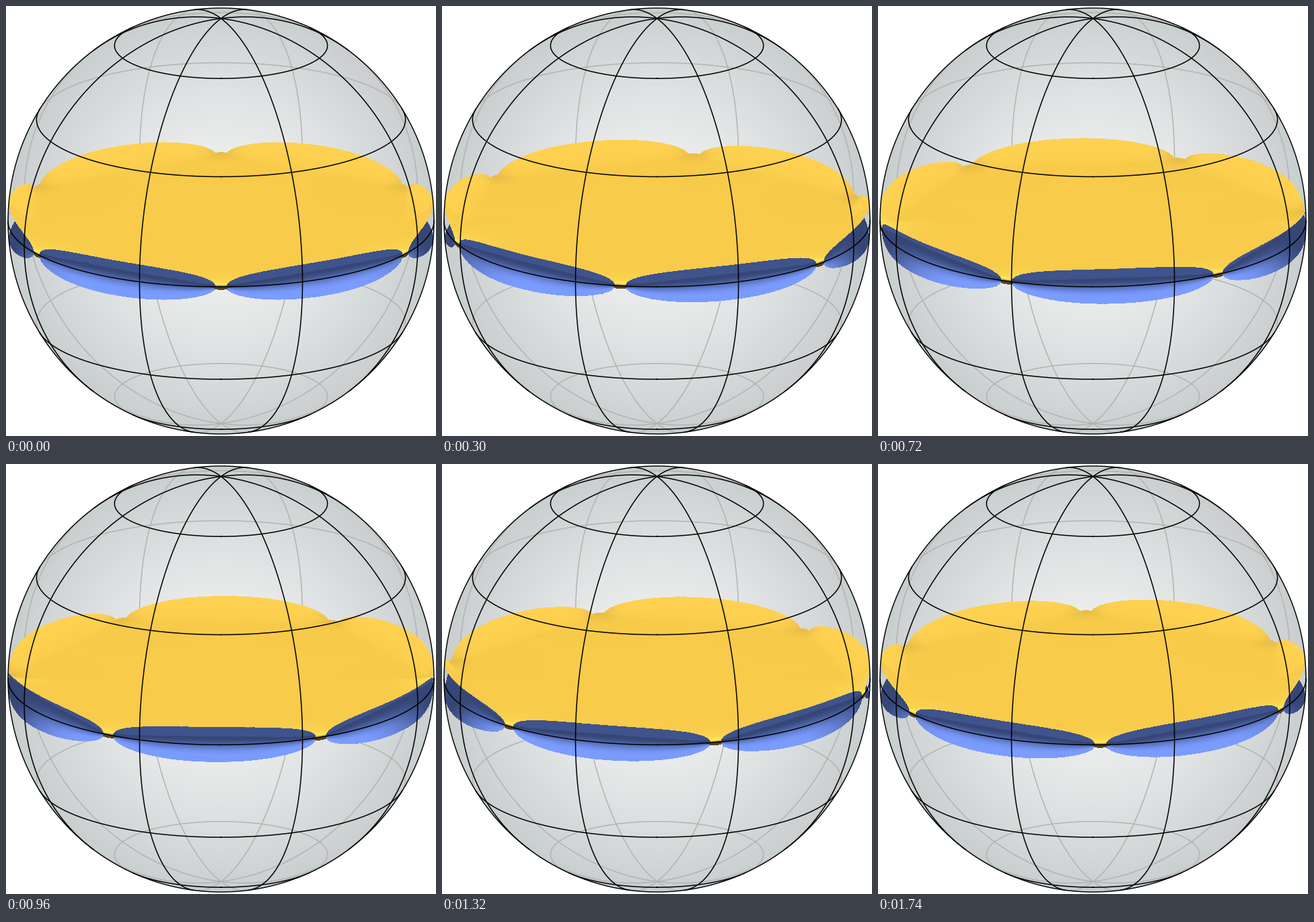
Write a matplotlib script that moves like this. It is 636 by 636 pixels and loops after 1800 ms.

```python
import numpy as np
import matplotlib.pyplot as plt
from matplotlib.animation import FuncAnimation

SIZE, CENTER, R = 636, 317.5, 315
FRAMES, INTERVAL = 30, 60
TILT = np.radians(18)
SE, CE = np.sin(TILT), np.cos(TILT)
APOTHEM = np.cos(np.pi / 6)
TOP, BOTTOM = 184, 452          # rows that the plate can reach
ZMAX = 0.1
STEPS = 30
NECK = 0.015

YELLOW = np.array([248, 203, 75])
YELLOW_LIT = np.array([255, 210, 82])
GLOW = np.array([255, 230, 90])
SHADE = np.array([222, 181, 66])
WALL = np.array([84, 68, 30])
UNDER = np.array([112, 90, 36])
CEILING = np.array([63, 83, 140])
FLOOR_IN = np.array([54, 70, 118])
FLOOR_OUT = np.array([122, 156, 255])


def mix(a, b, t):
    return a + (b - a) * np.asarray(t)[..., None]


def smoothstep(lo, hi, v):
    t = np.clip((v - lo) / (hi - lo), 0, 1)
    return t * t * (3 - 2 * t)


def sector_angle(x, f):
    """Angle from the middle of the nearest hexagon edge."""
    return np.mod(np.arctan2(x, f), np.pi / 3) - np.pi / 6


def rim_latitude(psi):
    u = np.clip(np.abs(psi) / np.radians(28.5), 0, 1)
    return np.radians(4.95) * (1 - u ** 2.2) ** (1 / 2.2)


def profile(x, f):
    """Half thickness, flare fraction and distance to the nearest vertex."""
    psi = sector_angle(x, f)
    r = np.hypot(x, f)
    a = r * np.cos(psi)
    lat = rim_latitude(psi)
    span = np.maximum(np.cos(lat) * np.cos(psi) - APOTHEM, 1e-4)
    q = np.clip((a - APOTHEM) / span, 0, 1)
    d = np.hypot(a - APOTHEM, np.abs(r * np.sin(psi)) - 0.5)
    h = np.maximum(np.sin(lat) * q ** 1.35, NECK * np.exp(-(d / 0.06) ** 2))
    return h, q, d


# Thickness lookup for fast marching
GRID, EXTENT = 1601, 1.02
axis = np.linspace(-EXTENT, EXTENT, GRID)
HEIGHT = profile(axis[None, :], axis[:, None])[0].astype(np.float32).ravel()
SCALE = (GRID - 1) / (2 * EXTENT)


def height(x, f):
    col = ((x + EXTENT) * SCALE + 0.5).astype(np.int32)
    row = ((f + EXTENT) * SCALE + 0.5).astype(np.int32)
    return HEIGHT[row * GRID + col]


# View rays through the slab |z| < ZMAX inside the ball
rows, cols = np.mgrid[TOP:BOTTOM, 0:SIZE]
px, py = (cols - CENTER) / R, (CENTER - rows) / R
half = np.sqrt(np.clip(1 - px ** 2 - py ** 2, 0, None))
enter = np.minimum(py * CE + half * SE, ZMAX)
leave = np.maximum(py * CE - half * SE, -ZMAX)
valid = (half > 0) & (enter > leave)
RX, RY, Z0, Z1 = px[valid], py[valid], enter[valid], leave[valid]


def render(i):
    turn = np.radians(2 * i)
    c, s = np.cos(turn), np.sin(turn)

    def local(x, y, z):
        f = (z * CE - y) / SE
        return x * c + f * s, f * c - x * s

    lx, lf = local(RX, RY, Z0)
    h0 = height(lx, lf)
    inside = np.abs(Z0) <= h0
    side = np.where(Z0 > 0, 1.0, -1.0)
    wall = inside & (np.abs(Z0) > np.sin(rim_latitude(sector_angle(lx, lf))))

    hit = np.full(RX.size, np.nan)
    live = np.flatnonzero(~wall)
    g = np.where(inside, h0 - np.abs(Z0), side * Z0 - h0)[live]
    for k in range(1, STEPS + 1):
        z0, dz = Z0[live], (Z1[live] - Z0[live]) / STEPS
        z = z0 + dz * k
        h = height(*local(RX[live], RY[live], z))
        new = np.where(inside[live], h - np.abs(z), side[live] * z - h)
        done = new < 0
        part = g[done] / (g[done] - new[done])
        hit[live[done]] = z0[done] + dz[done] * (k - 1 + part)
        live, g = live[~done], new[~done]

    z = np.where(np.isnan(hit), Z0, hit)
    _, q, d = profile(*local(RX, RY, z))
    facing = (z * CE - RY) / SE
    front = facing > 0

    color = mix(YELLOW, YELLOW_LIT, np.where(front, 0, np.sqrt(q)))
    color = np.where(front[:, None], mix(color, GLOW, np.exp(-d / 0.1)),
                     mix(color, SHADE, 0.6 * np.exp(-(d / 0.075) ** 2)))
    color[~inside & (side < 0)] = UNDER
    # The floor catches light where it slopes towards the viewer
    lit = smoothstep(0.12, 0.8, q) * smoothstep(0.15, 0.75, facing)
    blue = np.where((z > 0)[:, None], CEILING, mix(FLOOR_IN, FLOOR_OUT, lit))
    color = np.where(inside[:, None], blue, color)
    color[wall] = mix(WALL, GLOW, smoothstep(-0.002, 0.012, Z0[wall]))

    image = np.zeros(px.shape + (4,), np.uint8)
    shown = wall | ~np.isnan(hit)
    image[valid] = np.column_stack([color, np.where(shown, 255, 0)]).astype(np.uint8)
    return image


def ball():
    yy, xx = np.mgrid[0:SIZE, 0:SIZE]
    rho = np.hypot(xx - CENTER, yy - CENTER) / R
    w = 1 - np.clip(rho, 0, 1) ** 1.6
    image = mix(np.array([201, 206, 207]), np.array([242, 243, 243]), w)
    image[rho > 1] = 255
    return image.astype(np.uint8)


def grid_line(lon, lat):
    """Draw a curve on the sphere: black in front, grey behind."""
    x = np.cos(lat) * np.sin(lon)
    f = np.cos(lat) * np.cos(lon)
    z = np.sin(lat)
    sx = CENTER + R * x
    sy = CENTER - R * (z * CE - f * SE)
    depth = f * CE + z * SE
    ax.plot(sx, np.where(depth <= 0, sy, np.nan), color="#b2b2b2", lw=1.05, zorder=1)
    ax.plot(sx, np.where(depth >= 0, sy, np.nan), color="black", lw=1.1, zorder=3)


fig = plt.figure(figsize=(SIZE / 100, SIZE / 100), dpi=100, facecolor="white")
ax = fig.add_axes([0, 0, 1, 1])
ax.axis("off")
ax.imshow(ball(), interpolation="nearest", zorder=0)

t = np.linspace(0, 2 * np.pi, 1441)
for deg in (-60, -30, 0, 30, 60):
    grid_line(t, np.full_like(t, np.radians(deg)))
for deg in (22.5, 67.5, 112.5, 157.5):
    grid_line(np.full_like(t, np.radians(deg)), t)
ax.plot(CENTER + R * np.cos(t), CENTER + R * np.sin(t), color="black", lw=1.05, zorder=4)

frames = [render(i) for i in range(FRAMES)]
plate = ax.imshow(frames[0], interpolation="nearest", zorder=2,
                  extent=(-0.5, SIZE - 0.5, BOTTOM - 0.5, TOP - 0.5))
ax.set_xlim(-0.5, SIZE - 0.5)
ax.set_ylim(SIZE - 0.5, -0.5)
ax.set_aspect("auto")


def update(i):
    plate.set_data(frames[i])
    return [plate]


anim = FuncAnimation(fig, update, frames=FRAMES, interval=INTERVAL,
                     repeat=True, repeat_delay=0, blit=False)
plt.show()
```
